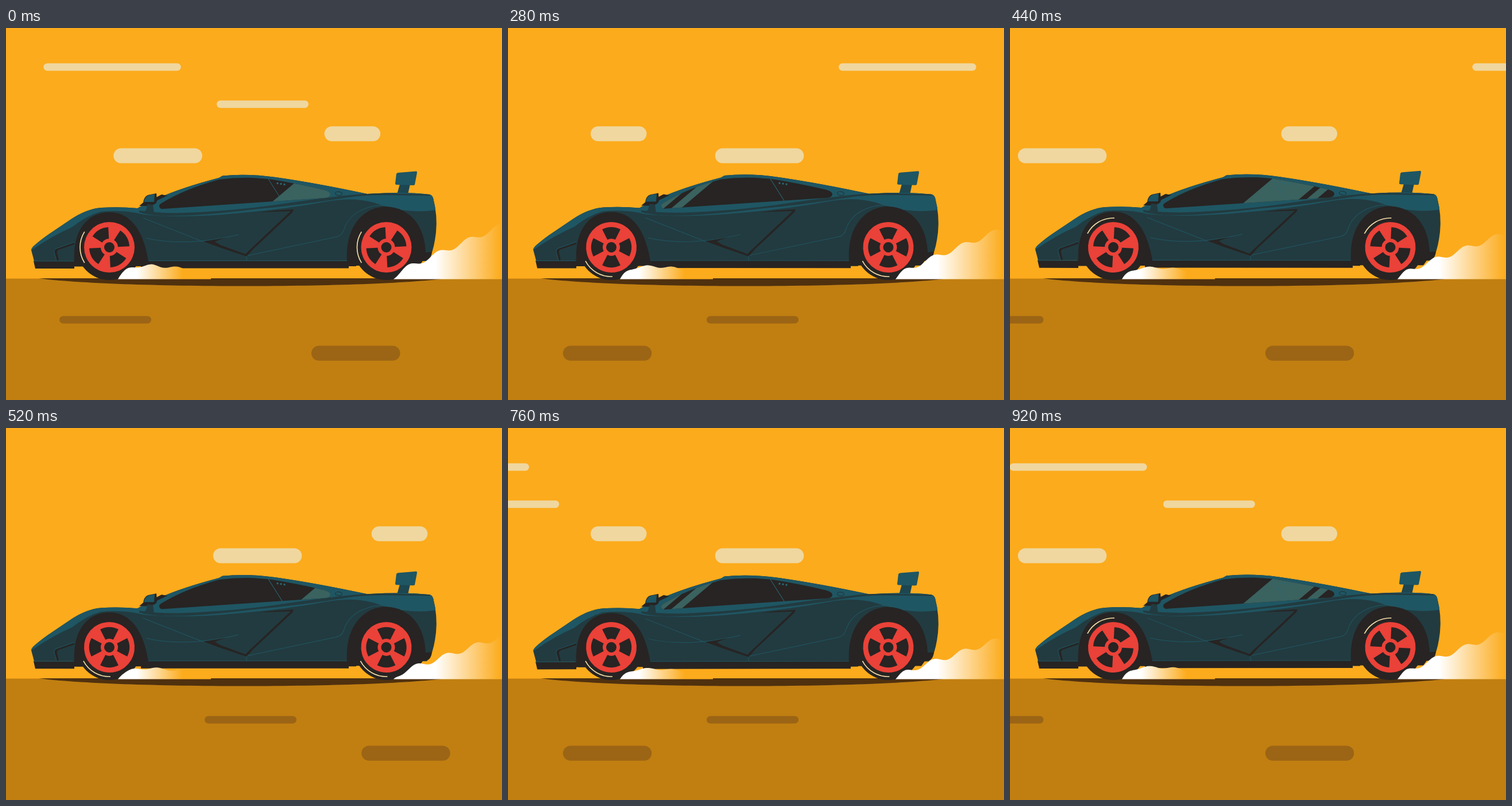
An HTML page with a canvas for the animation above (960 ms loop, 864x648 px).

```html
<!DOCTYPE html>
<html lang="en">
<head>
<meta charset="utf-8">
<title>Speeding car</title>
<style>
  html, body { margin: 0; width: 100%; height: 100%; overflow: hidden; background: #fcab1c; }
  canvas { display: block; width: 864px; height: 648px; }
</style>
</head>
<body>
<canvas id="stage" width="864" height="648"></canvas>
<script>
const ctx = document.getElementById('stage').getContext('2d');
const STEP = 40, COUNT = 24;
const SKY = '#fcab1c', GROUND = '#c17f11', CLOUD = '#f0d79f', STREAK = '#9b6515';
const BODY = '#223b40', TEAL = '#1f5663', BLACK = '#272423', RED = '#ea4138';
const GLASS_LIGHT = '#3a625f', SHADOW = '#50310f', CREAM = '#f5dea8';

const smooth = u => u * u * (3 - 2 * u);
const mod = (a, b) => ((a % b) + b) % b;

// Progress 0..1 of a move that repeats every `cycle` steps.
const progress = (n, start, dur, cycle) => Math.min(1, mod(n - start, cycle) / dur);

// Eased value between [step, value] keys, looping over the whole cycle.
function track(keys, n) {
  const i = keys.findLastIndex(k => k[0] <= n);
  const [t0, v0] = keys[i];
  const [t1, v1] = keys[i + 1] || [COUNT, keys[0][1]];
  return v0 + (v1 - v0) * smooth((n - t0) / (t1 - t0));
}

const bars = [
  { y: 61.5, w: 239.5, h: 13, from: -256.6, dist: 1154.5, start: 16, dur: 23, cycle: 24, ease: true, color: CLOUD },
  { y: 126.2, w: 160, h: 13, from: -170, dist: 1074, start: 16, dur: 16, cycle: 24, ease: true, color: CLOUD },
  { y: 171.2, w: 97.5, h: 26, from: -102.5, dist: 985.7, start: 4, dur: 12, cycle: 12, color: CLOUD },
  { y: 209.5, w: 154.5, h: 26, from: -159.7, dist: 1041, start: 4, dur: 6, cycle: 6, color: CLOUD },
  { y: 501.7, w: 160, h: 13, from: -179.5, dist: 1051, start: 4, dur: 6, cycle: 6, ease: true, color: STREAK },
  { y: 553.5, w: 154.5, h: 26, from: -166, dist: 1047, start: 4, dur: 12, cycle: 12, color: STREAK }
];

const frontBob = [[0, 0], [3, 1.2], [7, -0.6], [9, -2.5], [13, 0.2], [19, 1.4], [23, 0]];
const rearBob = [[0, 0], [3, 1.8], [7, -0.2], [9, -1.7], [13, 0.3], [19, 0.5], [23, -0.5]];
const smokeHeight = [[0, 95], [3, 95], [7, 90], [9, 87], [13, 76], [19, 73], [23, 85]];

function fill(d, color) {
  ctx.fillStyle = color;
  ctx.fill(new Path2D(d));
}

function line(d, color = TEAL, width = 1) {
  ctx.strokeStyle = color;
  ctx.lineWidth = width;
  ctx.stroke(new Path2D(d));
}

function disc(x, y, r, color) {
  ctx.fillStyle = color;
  ctx.beginPath();
  ctx.arc(x, y, r, 0, Math.PI * 2);
  ctx.fill();
}

function drawBar(bar, n) {
  const u = progress(n, bar.start, bar.dur, bar.cycle);
  ctx.fillStyle = bar.color;
  ctx.beginPath();
  ctx.roundRect(bar.from + bar.dist * (bar.ease ? smooth(u) : u), bar.y, bar.w, bar.h, bar.h / 2);
  ctx.fill();
}

const outline = 'M44 387 Q44 384 48 380 Q58 371 72 361 L112 334 Q140 315 166 313 Q198 311 229 314 ' +
  'Q250 302 266 296 Q306 278 371 261 L377 257.5 Q420 253 470 260 Q540 270 629 289 ' +
  'L660 287.5 Q705 286 738 290 Q742 291 744 296 Q752 327 749 356 Q746 382 740 396 L733 406 L49 406 Z';
const glass = 'M267 311 Q266 308 271 305 Q312 280 371 264 Q400 260 430 261 L458 263 ' +
  'Q508 271 550 281 Q565 284 565 290 Q565 295 556 296 L481 301 L275 315 Q268 316 267 311 Z';

function drawGlare(n) {
  const left = 144 + 425 * smooth(progress(n, 4.5, 11, 12));
  ctx.save();
  ctx.clip(new Path2D(glass));
  ctx.fillStyle = GLASS_LIGHT;
  for (const [a, b] of [[0, 89], [102, 119]]) {
    ctx.beginPath();
    ctx.moveTo(left + a + 59, 250);
    ctx.lineTo(left + b + 59, 250);
    ctx.lineTo(left + b - 24, 320);
    ctx.lineTo(left + a - 24, 320);
    ctx.fill();
  }
  ctx.restore();
}

function drawPaint() {
  fill(outline, BODY);
  ctx.save();
  ctx.clip(new Path2D(outline));
  fill('M40 390 Q80 362 115 347 Q140 327 165 320 Q205 316 240 325 Q310 332 410 322 Q490 315 560 302 ' +
    'Q605 294 640 304 Q680 318 712 319 Q735 320 752 316 V240 H40 Z', TEAL);
  fill('M232 318 Q265 323 310 322 Q400 318 470 308 Q550 296 600 291 Q625 288 660 288 L738 290 ' +
    'L738 292 L660 291 Q620 291 590 296 Q510 309 440 315 Q330 329 270 327 Q245 325 232 321 Z', BODY);
  ctx.restore();
}

function drawDetails() {
  // Nose intake and lower skirt
  fill('M119 373 L88 384 Q83 386 84 391 L88 405 H92 L89 392 Q88 388 92 386 L119 377 Z', BLACK);
  line('M119 373 L88 384 Q83 386 84 391 L88 405');
  fill('M48 406 H119 V419 H51 Z M117 404 H137 V415.5 H117 Z', BLACK);
  fill('M235 405 H610 V415 H597 V418.5 H235 Z', BLACK);
  fill('M730 391 L742 390 Q741 400 735 404 L725 406 Z', BLACK);
  line('M48 406 H119 M247 405.5 H595');

  // Door creases and side vent
  line('M239 331 L343 372 L418 397 L500 318');
  line('M244 366 Q312 382 405 360');
  line('M419 397 V406 M418 397 L575 364 Q585 362 588 353 Q598 319 641 310 Q666 306 690 317');
  fill('M343 372 L384 365 Q370 369 364 372 Q370 377 379 380 L417 394 L425 386 ' +
    'L496 319 L440 321 Q470 317 501 316 L499 321 L431 385 L419 398 L374 383 Z', BLACK);

  // Wheel arches
  fill('M119 406 C116 352 142 321 180 321 C217 321 239 352 248 406 L240 415 H124 Z', BLACK);
  fill('M594 407 C590 346 622 312 662 311 C706 313 730 347 731 393 L725 407 L720 414 H596 Z', BLACK);
}

function drawMirror() {
  fill('M256 298 L271 290 L281 292 L258 303 Z M232 310 L239 304 L251 306 L247 310 Z', BLACK);
  fill('M246 307 H256 L258 324 L238 323 Q246 318 246 307 Z', BODY);
  fill('M239 305 Q240 291 252 290 L262 288 L263 301 Q262 307 255 308 Z', BLACK);
  fill('M240 303 Q242 292 252 290.5 L259 289.5 L258 303 Z', TEAL);
}

function drawWing() {
  fill('M686 272 H704 L700 290 H681 Z', '#1d4650');
  fill('M680 254 Q681 252 684 252 L715 249.5 Q716 250 716 252 L712 273 Q711 274 709 274 L680 273 Q678 273 678 271 Z', TEAL);
}

function drawBody(n) {
  const front = track(frontBob, n);
  const tilt = (track(rearBob, n) - front) / 650;
  ctx.save();
  ctx.transform(1, tilt, 0, 1, 0, front - 50 * tilt);
  drawWing();
  drawPaint();
  drawDetails();
  fill(glass, BLACK);
  drawGlare(n);
  line('M457 263 L481 301', '#2b6875');
  for (let i = 0; i < 3; i++) disc(473 + i * 6, 270.5 + i, 1.7, '#2b6875');
  ctx.strokeStyle = BODY;
  ctx.lineWidth = 1.4;
  ctx.beginPath();
  ctx.ellipse(579.5, 288.5, 6, 3.3, 0.1, 0, Math.PI * 2);
  ctx.stroke();
  drawMirror();
  ctx.restore();
}

function drawWheel(x, n) {
  const half = 27 * Math.PI / 180;
  ctx.save();
  ctx.translate(x, 382);
  disc(0, 0, 57, BLACK);
  ctx.rotate(-n * Math.PI / 3);
  disc(0, 0, 44, RED);
  ctx.fillStyle = BLACK;
  for (let i = 0; i < 4; i++) {
    const mid = (60 + i * 90) * Math.PI / 180;
    ctx.beginPath();
    ctx.arc(0, 0, 35, mid - half, mid + half);
    ctx.arc(0, 0, 15, mid + half, mid - half, true);
    ctx.fill();
  }
  disc(0, 0, 9, BLACK);
  ctx.strokeStyle = CREAM;
  ctx.lineWidth = 1.7;
  ctx.beginPath();
  ctx.arc(0, 0, 51, Math.PI - 0.56, Math.PI + 0.56);
  ctx.stroke();
  ctx.restore();
}

function drawSmoke(left, right, whiteEnd, fadeEnd, height) {
  const shade = ctx.createLinearGradient(whiteEnd, 0, fadeEnd, 0);
  shade.addColorStop(0, '#fff');
  shade.addColorStop(1, SKY);
  ctx.fillStyle = shade;
  ctx.beginPath();
  ctx.moveTo(left, 437.5);
  for (let x = left; x <= right; x++) ctx.lineTo(x, 437.5 - Math.max(0, height(x)));
  ctx.lineTo(right, 437.5);
  ctx.fill();
}

function drawFrontSmoke(n, scale) {
  drawSmoke(195, 357, 228, 308, x => {
    const rise = 1 - Math.exp((195 - x) / 13);
    const puff = 2.2 * Math.cos((x - 242 - 11 * (n - 3)) * Math.PI / 22);
    return scale * rise * (24 + puff - Math.max(0, x - 255) * 0.1);
  });
}

function drawRearSmoke(n, scale) {
  drawSmoke(675, 864, 748, 862, x => {
    const rise = 1 - Math.exp((675 - x) / 8);
    const puff = 4.6 * Math.sin((x - 714 - 13 * n) * Math.PI / 26);
    return rise * (scale * (17 + 0.44 * (x - 690)) - puff);
  });
}

function draw(n) {
  ctx.fillStyle = SKY;
  ctx.fillRect(0, 0, 864, 648);
  ctx.fillStyle = GROUND;
  ctx.fillRect(0, 436.5, 864, 212);
  bars.forEach(bar => drawBar(bar, n));
  fill('M57 436 H766 C640 454 190 454 57 436 Z', SHADOW);
  drawBody(n);
  drawWheel(180, n);
  drawWheel(662.5, n);
  const scale = track(smokeHeight, n) / 95;
  drawFrontSmoke(n, scale);
  drawRearSmoke(n, scale);
}

function tick() {
  draw(Math.floor(performance.now() / STEP) % COUNT);
  requestAnimationFrame(tick);
}
tick();
</script>
</body>
</html>
```
